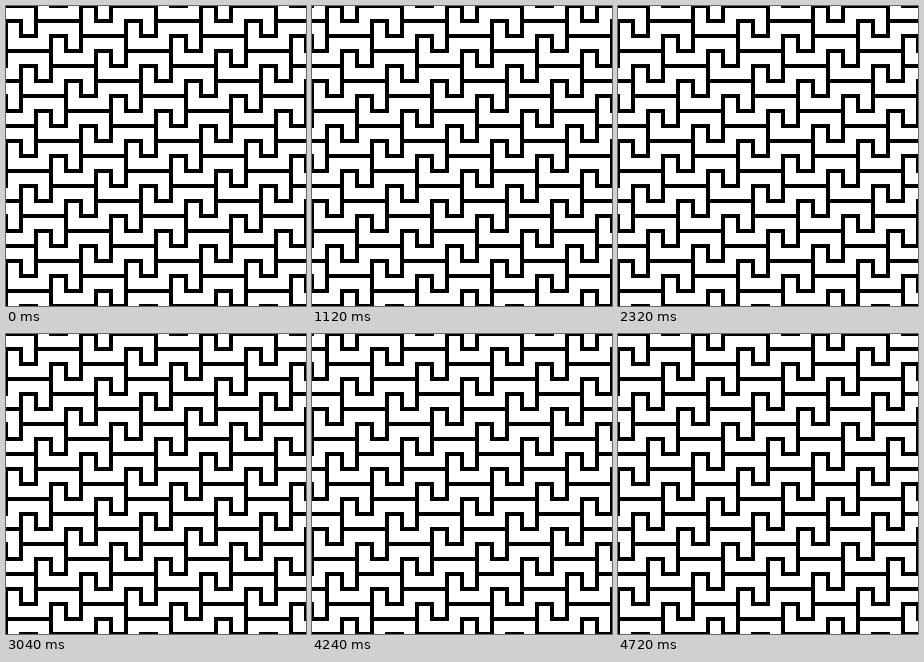
Write an HTML page that moves like this. It is 300x300 px and loops after 4800 ms.

```html
<!DOCTYPE html>
<html lang="en">
<head>
<meta charset="utf-8">
<title>Meander tiling</title>
<style>
  html, body { margin: 0; width: 100%; height: 100%; overflow: hidden; background: #fff; }
  svg { position: absolute; inset: 0; width: 300px; height: 300px; }
  path { fill: none; stroke: #000; stroke-width: 4; stroke-linecap: square; }
  #tiling { animation: hop 2400ms -80ms step-end infinite; }
  @keyframes hop {
    0% { transform: translateX(60px); }
    3.33333% { transform: none; }
    50% { transform: translateX(60px); }
  }
  #tiling { animation: hop 2400ms infinite step-end; }
  @keyframes hop {
    0% { transform: none; }
    46.66667% { transform: translateX(60px); }
    96.66667% { transform: none; }
  }
</style>
</head>
<body>
<svg viewBox="0 0 300 300"><path id="tiling"/></svg>
<script>
  const unit = 15, period = 8, slope = 3;
  // One hook: long stem, narrow top, inner step, and the bar joining the next stem.
  const hook = (x, y) => {
    const at = (dx, dy) => `${(x + dx) * unit} ${(y + dy) * unit}`;
    return `M${at(0, 3)}L${at(0, 0)}L${at(1, 0)}L${at(1, 1)}L${at(2, 1)}M${at(-3, 1)}L${at(0, 1)}`;
  };
  let d = "";
  for (let y = -4; y <= 21; y++) {
    const first = (slope * (y - 1) + 10 * period) % period;
    for (let x = first - 2 * period; x < 32; x += period) d += hook(x, y);
  }
  document.getElementById("tiling").setAttribute("d", d);
</script>
</body>
</html>
```
